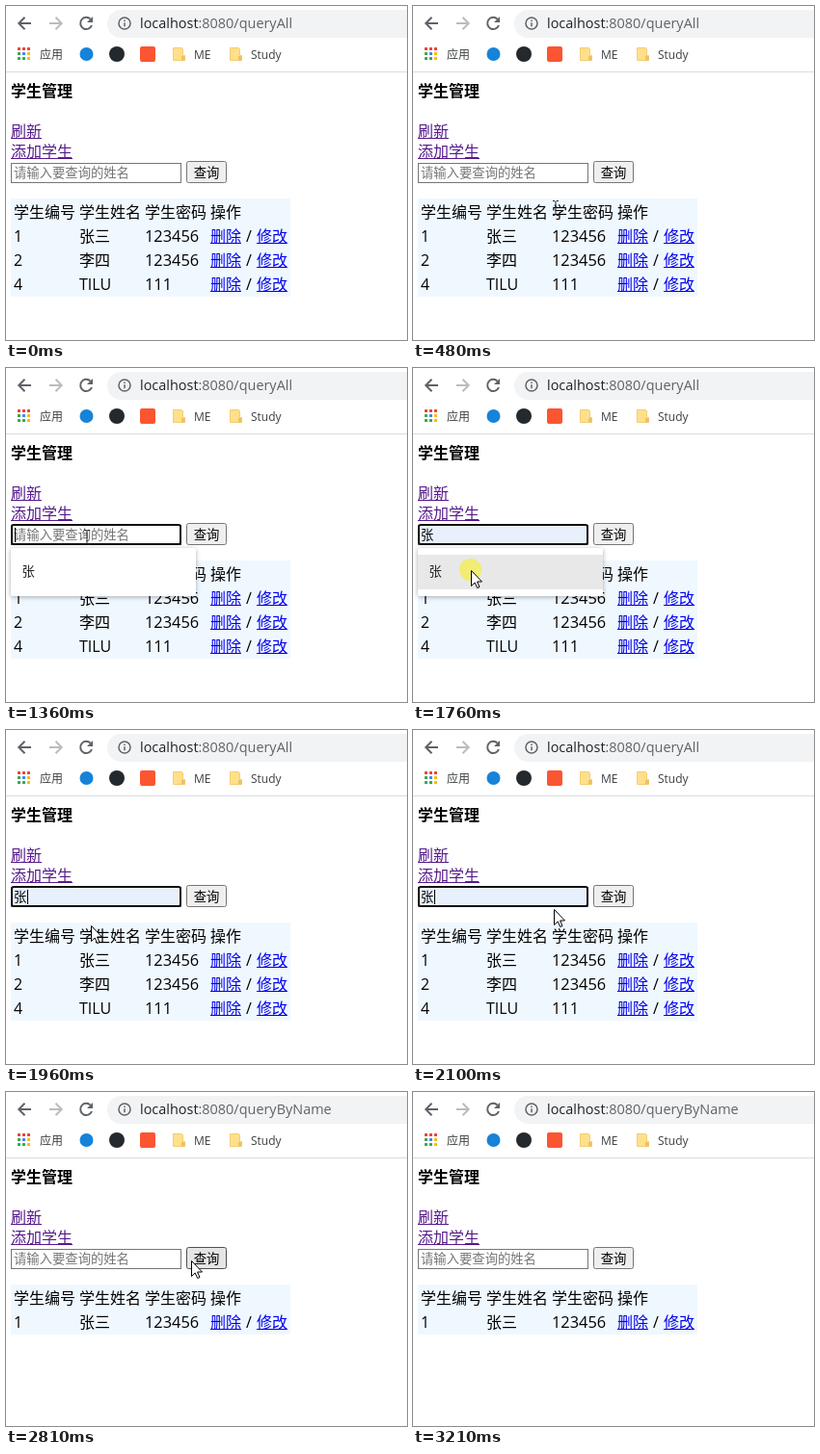
Write an HTML page that moves like this. It is 416x347 px and loops after 4.35 s.

```html
<!DOCTYPE html>
<html lang="zh-CN">
<head>
<meta charset="utf-8">
<title>学生管理</title>
<style>
  html, body { margin: 0; width: 100%; height: 100%; overflow: hidden; background: #fff; }
  svg { display: block; }
  text { font: 16px "Open Sans", "Noto Sans CJK SC", "Noto Sans CJK", sans-serif; white-space: pre; }
  .url { font-size: 14.45px; fill: #5f6368; }
  .host { fill: #202124; }
  .mark { font-size: 12px; fill: #3c4043; }
  .form { font-size: 13.333px; }
  .code { font-size: 16.4px; }
  .hint { fill: #757575; }
  .link { fill: #00e; }
  .seen { fill: #551a8b; }
  .box { shape-rendering: crispEdges; }
  .icon { fill: none; stroke: #5f6368; stroke-width: 2; }
  .icon .off { stroke: #babcbe; }
  .icon .solid { fill: #5f6368; stroke: none; }
  .thin { stroke-width: 1.5; }
  #field { fill: #fff; stroke: #767676; }
  #field.hover { stroke: #4f4f4f; }
  #field.filled { fill: #e8f0fe; }
  #button { fill: #efefef; stroke: #767676; }
  #button.hover { fill: #e5e5e5; stroke: #4f4f4f; }
  #button.press { fill: #f5f5f5; stroke: #8d8d8d; }
  #popup { filter: drop-shadow(0 1px 2.5px rgba(0, 0, 0, .32)); }
</style>
</head>
<body>
<svg width="416" height="347" viewBox="0 0 416 347">
  <defs>
    <g id="folder">
      <path d="M.5 .5H9.500L10.500 2V8.500H12.500V13.500H.5Z" fill="#ffe08a" stroke="#f3cd74"/>
      <path d="M9 13.500V9H12.500V13.500Z" fill="#eec163"/>
    </g>
    <g id="actions">
      <g class="link">
        <text x="212" y="245">删除</text>
        <text x="260" y="245">修改</text>
        <path class="box" d="M212 246h32v1h-32zM260 246h32v1h-32z"/>
      </g>
      <text x="249" y="245">/</text>
    </g>
  </defs>

  <!-- Browser bar -->
  <g class="icon">
    <path d="M26 18H13.5M19.5 11.8L13.3 18L19.5 24.2"/>
    <path class="off" d="M45 18H57.5M51.5 11.8L57.7 18L51.5 24.2"/>
    <path d="M87.6 13.6A6.1 6.1 0 1 0 89 20"/>
    <path class="solid" d="M90 11V17H84Z"/>
  </g>
  <path d="M416 4H119.5A14.5 14.5 0 0 0 119.5 33H416Z" fill="#f1f3f4"/>
  <g class="icon thin">
    <circle cx="123" cy="18" r="6"/>
    <path d="M123 17.2V21.2M123 14.5V16"/>
  </g>
  <text class="url" x="139" y="23"><tspan class="host">localhost</tspan>:8080/<tspan id="route">queryAll</tspan></text>

  <!-- Bookmarks -->
  <g id="apps"></g>
  <text class="mark" x="35" y="54.5">应用</text>
  <circle cx="83.5" cy="50" r="7" fill="#1683d8"/>
  <circle cx="115" cy="50" r="8" fill="#24292e"/>
  <rect x="139" y="42" width="16" height="16" rx="2" fill="#fc5531"/>
  <use href="#folder" x="173" y="43"/>
  <text class="mark" x="195" y="54.5">ME</text>
  <use href="#folder" x="232" y="43"/>
  <text class="mark" x="254" y="54.5">Study</text>
  <rect class="box" y="68" width="416" height="1" fill="#d9dbde"/>

  <!-- Page -->
  <text x="5" y="94" style="font-weight:bold">学生管理</text>
  <g class="seen">
    <text x="5" y="136">刷新</text>
    <text x="5" y="157">添加学生</text>
    <path class="box" d="M5 137h32v1h-32zM5 158h64v1h-64z"/>
  </g>
  <rect id="field" x="5.5" y="163.5" width="176" height="20"/>
  <rect id="ring" x="6" y="163" width="175" height="20" rx="2" fill="none" stroke="#101010" stroke-width="2"/>
  <text id="hint" class="form hint" x="8" y="178">请输入要查询的姓名</text>
  <text id="value" class="form" x="8" y="178">张</text>
  <rect id="caret" class="box" y="166" width="1" height="15"/>
  <rect id="button" x="187.5" y="161.5" width="41" height="22" rx="2"/>
  <text class="form" x="194.7" y="178">查询</text>

  <rect id="table" class="box" x="5" y="200" width="290" fill="#f0f8ff"/>
  <text x="8" y="220">学生编号</text>
  <text x="76" y="220">学生姓名</text>
  <text x="144" y="220">学生密码</text>
  <text x="212" y="220">操作</text>
  <g>
    <text x="8" y="245">1</text><text x="76" y="245">张三</text><text class="code" x="144" y="245">123456</text>
    <use href="#actions"/>
  </g>
  <g id="others">
    <text x="8" y="270">2</text><text x="76" y="270">李四</text><text class="code" x="144" y="270">123456</text>
    <use href="#actions" y="25"/>
    <text x="8" y="295">4</text><text x="76" y="295">TILU</text><text class="code" x="144" y="295">111</text>
    <use href="#actions" y="50"/>
  </g>

  <g id="popup">
    <rect x="5" y="187" width="192" height="50" rx="2" fill="#fff"/>
    <rect id="option" class="box" x="5" y="194" width="192" height="36" fill="#e8e8e8"/>
    <text class="form" x="16.5" y="216" fill="#222">张</text>
  </g>

  <g id="pointer">
    <circle id="click" cx="-.5" cy="-.5" r="11.5" fill="#f4ee45" fill-opacity=".72"/>
    <path id="arrow" d="M.5 .5V16.5L4.2 13L6.7 18.5L9 17.5L6.6 12H11.5Z" fill="#fff" stroke="#000"/>
    <path id="beam" d="M-3 -7.5H-1L0 -6.5L1 -7.5H3M0 -6.5V6.5M-3 7.5H-1L0 6.5L1 7.5H3" fill="none" stroke="#222"/>
  </g>
</svg>
<script>
const LOOP = 4350;
const TYPE = 1430, PICK = 1890, SUBMIT = 2680, RESULT = 2740;
const $ = id => document.getElementById(id);

// Pointer stops: time, x, y
const stops = [
  [130, 333, 333], [200, 300, 305], [270, 258, 277], [340, 214, 249], [410, 176, 226],
  [480, 148, 210], [550, 130, 199], [620, 116, 192], [690, 92, 177], [760, 86, 173],
  [1300, 84, 176], [1370, 77, 187], [1430, 69, 198], [1500, 63, 206], [1560, 60, 210],
  [1890, 66, 208], [1960, 88, 203], [2030, 118, 194], [2100, 146, 186], [2170, 167, 180],
  [2240, 180, 176], [2310, 189, 174], [2450, 192, 175],
  [2940, 207, 181], [3010, 252, 198], [3080, 321, 227], [3140, 383, 251]
];

const dots = ['#ea4335', '#34a853', '#4285f4', '#fbbc04'];
[...'000123113'].forEach((c, i) => {
  const x = 12 + i % 3 * 5, y = 43 + Math.floor(i / 3) * 5;
  $('apps').insertAdjacentHTML('beforeend',
    `<rect x="${x}" y="${y}" width="3" height="3" rx=".5" fill="${dots[c]}"/>`);
});

const show = (id, on) => $(id).style.display = on ? '' : 'none';

function render(t) {
  const within = (a, b) => t >= a && t < b;
  const done = t >= RESULT;
  const typed = within(TYPE, RESULT);

  $('route').textContent = done ? 'queryByName' : 'queryAll';
  $('table').setAttribute('height', done ? 52 : 102);
  show('others', !done);

  $('field').classList.toggle('hover', within(690, 1370));
  $('field').classList.toggle('filled', typed);
  show('ring', within(1040, SUBMIT));
  show('hint', !typed);
  show('value', typed);
  show('caret', within(1040, TYPE) || within(PICK, 2380));
  $('caret').setAttribute('x', typed ? 22 : 9);

  show('popup', within(1100, PICK));
  show('option', within(TYPE, PICK));
  $('button').classList.toggle('hover', within(2310, 3010));
  $('button').classList.toggle('press', within(SUBMIT, RESULT));

  const stop = stops.filter(s => s[0] <= t).pop();
  const beam = within(480, 550) || within(690, 1370);
  show('pointer', stop && t < 3210);
  if (stop) $('pointer').setAttribute('transform', `translate(${stop[1]} ${stop[2]})`);
  show('beam', beam);
  show('arrow', !beam);
  show('click', within(1040, 1100) || within(1760, PICK) || within(SUBMIT, RESULT));
}

const start = performance.now();
function tick() {
  render((performance.now() - start) % LOOP);
  requestAnimationFrame(tick);
}
render(0);
requestAnimationFrame(tick);
</script>
</body>
</html>
```
